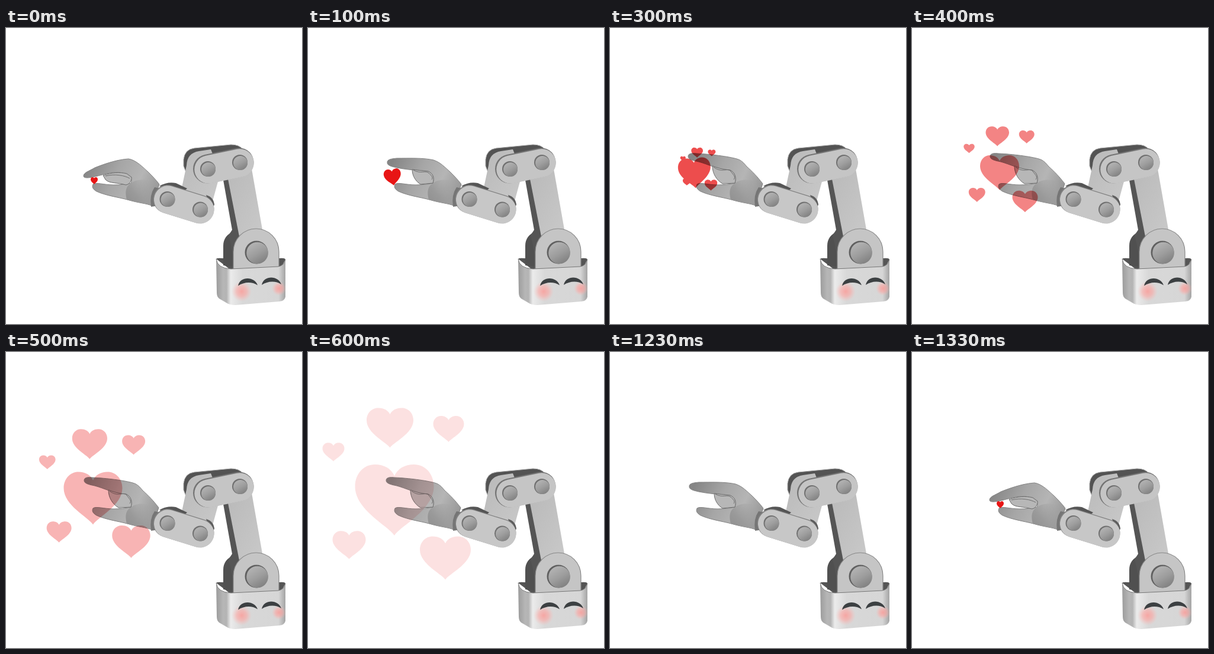
These frames come from a looping animation (500 by 500 pixels, 1.73 s). An HTML page:

```html
<!DOCTYPE html>
<html lang="en">
<head>
<meta charset="utf-8">
<title>Robot arm with hearts</title>
<style>
html, body { margin: 0; width: 100%; height: 100%; overflow: hidden; background: #fff; }
svg { display: block; width: 100vw; height: 100vh; }
</style>
</head>
<body>
<svg viewBox="0 0 500 500">
  <defs>
    <linearGradient id="skin" x1="0" x2="1" y1=".3" y2=".6">
      <stop offset="0" stop-color="#858585"/><stop offset=".4" stop-color="#a6a6a6"/>
      <stop offset=".72" stop-color="#b5b5b5"/><stop offset="1" stop-color="#989898"/>
    </linearGradient>
    <linearGradient id="palm" x1="0" x2="1" y1="1" y2=".3">
      <stop offset="0" stop-color="#8e8e8e"/><stop offset=".4" stop-color="#9a9a9a"/>
      <stop offset="1" stop-color="#a5a5a5" stop-opacity="0"/>
    </linearGradient>
    <linearGradient id="link" x1="0" x2="1" y1="0" y2="1">
      <stop offset="0" stop-color="#b9b9b9"/><stop offset="1" stop-color="#c9c9c9"/>
    </linearGradient>
    <linearGradient id="knob" x1=".2" x2=".8" y1="0" y2="1">
      <stop offset="0" stop-color="#b6b6b6"/><stop offset=".5" stop-color="#9e9e9e"/>
      <stop offset="1" stop-color="#7d7d7d"/>
    </linearGradient>
    <linearGradient id="box">
      <stop offset="0" stop-color="#9c9c9c"/><stop offset=".1" stop-color="#b6b6b6"/>
      <stop offset=".15" stop-color="#b4b4b4"/><stop offset=".21" stop-color="#ebebeb"/>
      <stop offset=".38" stop-color="#d8d8d8"/><stop offset=".9" stop-color="#d6d6d6"/>
      <stop offset="1" stop-color="#a4a4a4"/>
    </linearGradient>
    <radialGradient id="blush">
      <stop offset="0" stop-color="#ff9591" stop-opacity=".75"/>
      <stop offset=".5" stop-color="#ffa29e" stop-opacity=".55"/>
      <stop offset="1" stop-color="#ffb5b0" stop-opacity="0"/>
    </radialGradient>
    <path id="heart" d="M0 .5C-.08 .36-.5 .14-.5-.19C-.5-.38-.38-.5-.25-.5C-.13-.5-.04-.44 0-.34C.04-.44 .13-.5 .25-.5C.38-.5 .5-.38 .5-.19C.5 .14 .08 .36 0 .5Z"/>
    <g id="joint">
      <circle cx="-.5" cy="-.5" r="13" fill="#707070"/>
      <circle cx=".5" cy=".5" r="12" fill="url(#knob)"/>
    </g>
  </defs>

  <!-- base top and upright -->
  <path d="M355 390Q357 388 366 389H462Q471 388 472 391L464 406L380 409Z" fill="#555"/>
  <path d="M367 401V368Q367 350 386 343L398 352L390 404Z" fill="#505050"/>
  <path d="M364 240H380L397 352L384 385L376 350L382 341Z" fill="#555"/>
  <path d="M372 240L415 238L434 346L394 352Z" fill="url(#link)"/>
  <path d="M384 407V378A38.5 39 0 0 1 461 378V405Z" fill="#c5c5c5" stroke="#888" stroke-width="1.2"/>
  <circle cx="423" cy="379" r="19.5" fill="#606060"/>
  <circle cx="424.5" cy="380" r="18.3" fill="url(#knob)"/>

  <!-- box and face -->
  <path d="M355 390Q357 406 380 407L460 403Q470 401 472 391V454Q471 461 461 462L388 468Q377 468 372 464L360 457Q356 454 356 447Z" fill="url(#box)"/>
  <path d="M355 390Q357 406 380 407L460 403Q470 401 472 391" fill="none" stroke="#777"/>
  <circle cx="398" cy="445" r="17" fill="url(#blush)"/>
  <circle cx="461" cy="440" r="12" fill="url(#blush)"/>
  <g fill="#3c4042">
    <path id="eye" d="M392 435.500C395 419 420 419 425 434.500C415 428 402 429 392 435.500Z"/>
    <use href="#eye" x="40" y="-1.500"/>
  </g>

  <!-- middle link and elbow -->
  <path d="M305 246L300 233V222Q302 205 318 203L380 197Q394 197 400 205L390 215L325 232Z" fill="#535353" stroke="#a8a8a8"/>
  <path d="M305 232Q306 211 326 208L346 205L362 245L348 296L296 284V274Z" fill="url(#link)"/>
  <g stroke-linecap="round" fill="none">
    <path d="M340.500 238L394 227" stroke="#747474" stroke-width="49"/>
    <path d="M342 239L395 228" stroke="#c5c5c5" stroke-width="47.500"/>
  </g>
  <use href="#joint" x="341.500" y="238.500"/>
  <use href="#joint" x="395.500" y="227.500"/>

  <g stroke-linejoin="round">
    <path id="body" fill="url(#skin)" stroke="#828282"/>
    <path d="M211 262C200 269 202 281 204 290C225 296 236 296 246 300L258 263C245 258 225 252 211 262Z" fill="url(#palm)"/>
    <path id="inner" fill="#b7b7b7" stroke="#6b6b6b"/>
    <path id="crease" fill="none" stroke="#656565" stroke-width=".9"/>
  </g>

  <!-- forearm -->
  <path d="M251 269Q242 282 245 302L258 300L265 272Z" fill="#757575"/>
  <path d="M259 267Q273 259 287 262L306 271L296 280Z" fill="#555"/>
  <path d="M338 282Q351 286 352 299L345 306Z" fill="#5d5d5d"/>
  <g stroke-linecap="round" fill="none">
    <path d="M272.500 289L327.500 306" stroke="#818181" stroke-width="48"/>
    <path d="M273.500 290L328 307" stroke="#c7c7c7" stroke-width="47"/>
  </g>
  <use href="#joint" x="273" y="289.500"/>
  <use href="#joint" x="328.500" y="307"/>

  <g id="hearts" fill="#e81515"></g>
</svg>
<script>
const $ = id => document.getElementById(id);
const thumb = 'L246 300C236 296 225 296 205 290C190 286 168 283 153 276C146 272 145 268 147 264C152 260 165 265 182 265C192 265 202 264 211 262';

const poses = {
  closed: {
    body: 'M131 250C131 244 140 242 150 236C170 228 190 222 207 221C220 223 232 236 240 243C247 250 253 256 259 264' + thumb +
      'C214 256 210 250 203 247C190 242 180 244 170 246C158 249 145 253 137 253C133 253 131 252 131 250Z',
    inner: 'M164 249C178 244 192 243 204 246L212 252C213 259 207 265 202 265C190 261 174 263 168 256Z',
    crease: 'M168 250C184 246 200 249 209 254'
  },
  half: {
    body: 'M134 228C133 222 140 221 150 220C170 220 195 219 212 223C224 227 232 236 240 243C247 250 253 256 259 264' + thumb +
      'C214 252 209 244 200 242C185 240 170 240 150 236C141 234 134 232 134 228Z',
    inner: 'M176 239C176 250 182 259 190 264L211 262C214 252 211 246 203 242C192 241 184 240 176 239Z',
    crease: 'M178 240C190 247 199 240 204 245C208 249 212 252 209 256'
  },
  open: {
    body: 'M132 217C132 212 138 211 146 212C170 213 200 217 214 221C222 223 226 228 231 234C241 243 249 251 258 263' + thumb +
      'C214 252 209 241 200 240C180 238 165 230 150 226C140 224 132 222 132 217Z',
    inner: 'M173 233C173 246 180 257 190 263L211 262C214 252 211 244 203 240C190 239 180 236 173 233Z',
    crease: 'M175 235C190 246 198 235 204 242C208 248 213 251 209 256'
  }
};

// Main heart at each 100 ms step: x, y, width, height, tilt
const mainHeart = [
  [149, 258, 12, 12, 0], [143, 252, 29, 28, -8], [138, 247, 47, 45, -10], [143, 245, 55, 51, -4],
  [148, 244.5, 66, 59, 0], [147, 247, 99, 89, 0], [146, 250, 133, 120, 0]
];
const opacity = [1, 1, 1, .76, .53, .32, .13];
// Final x, y and width of the hearts that burst from the fingers
const burst = [[138.5, 128, 79], [237.5, 130, 52], [43, 169, 37], [69.5, 326, 56], [232, 348, 86]];
const origin = [150, 238];

const heart = (x, y, w, h, tilt = 0) =>
  `<use href="#heart" transform="translate(${x} ${y}) rotate(${tilt}) scale(${w} ${h})"/>`;

function draw(step, pose) {
  for (const part in poses[pose]) $(part).setAttribute('d', poses[pose][part]);
  const group = $('hearts');
  if (step > 6) return group.innerHTML = '';
  let html = heart(...mainHeart[step]);
  const p = (step - 2) / 4;
  if (p > 0) for (const [x, y, w] of burst) {
    html += heart(origin[0] + (x - origin[0]) * p, origin[1] + (y - origin[1]) * p, w * p, w * p * .85);
  }
  group.innerHTML = html;
  group.style.opacity = opacity[step];
  group.style.mixBlendMode = p > 0 ? 'multiply' : 'normal';
}

let shown;
function frame() {
  const t = performance.now() % 1730;
  const step = t >= 1330 ? 0 : Math.min(7, Math.floor(t / 100));
  const pose = step === 0 ? 'closed' : step === 1 || t >= 1230 ? 'half' : 'open';
  if (shown !== step + pose) {
    draw(step, pose);
    shown = step + pose;
  }
  requestAnimationFrame(frame);
}
frame();
</script>
</body>
</html>
```
